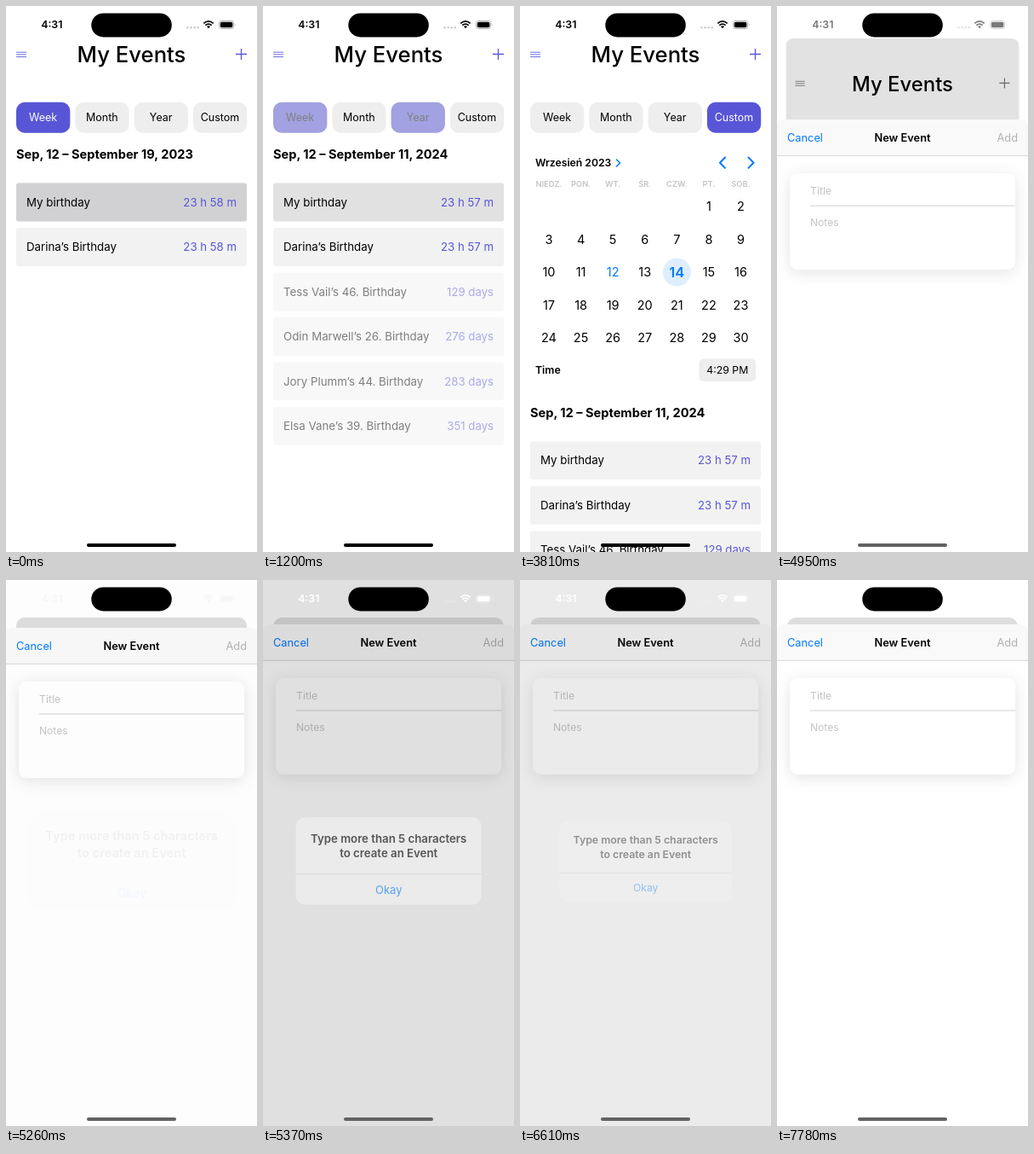
Animation of 295x640 px, one loop 8 s. Source, as an HTML page:

```html
<!DOCTYPE html>
<html lang="en">
<head>
<meta charset="utf-8">
<title>My Events</title>
<style>
  html, body { margin: 0; width: 100%; height: 100%; overflow: hidden; background: #fff; }
  svg { display: block; width: 295px; height: 640px; font-family: Inter, "Open Sans", sans-serif; }
</style>
</head>
<body>
<svg id="stage" viewBox="0 0 295 640"></svg>
<script>
const LOOP = 8000;
const INDIGO = '#5856d6', BLUE = '#007aff';
const stage = document.getElementById('stage');

const TICKS = [0, 510, 1200, 1330, 2110, 2210, 3810,
  4610, 4720, 4830, 4950, 5050, 5150, 5260, 5370, 5480, 5590, 5690,
  6390, 6500, 6610, 6720, 6840];

const EVENTS = [
  ['My birthday'], ['Darina’s Birthday'],
  ['Tess Vail’s 46. Birthday', 129],
  ['Odin Marwell’s 26. Birthday', 276],
  ['Jory Plumm’s 44. Birthday', 283],
  ['Elsa Vane’s 39. Birthday', 351]
];

const ramp = (t, a, b) => Math.min(1, Math.max(0, (t - a) / (b - a)));
const spring = (t, start, speed) => {
  const x = Math.max(0, t - start) / 1000 * speed;
  return 1 - (1 + x) * Math.exp(-x);
};

// y is the middle of the capital letters
const text = (s, x, y, size, { fill = '#000', weight = 400, anchor = 'start' } = {}) =>
  `<text x="${x}" y="${y + size * .36}" font-size="${size}" font-weight="${weight}" text-anchor="${anchor}" style="fill:${fill}">${s}</text>`;
const box = (x, y, w, h, r, fill, more = '') =>
  `<rect x="${x}" y="${y}" width="${w}" height="${h}" rx="${r}" fill="${fill}" ${more}/>`;
const line = (d, color, width, more = '') =>
  `<path d="${d}" fill="none" stroke="${color}" stroke-width="${width}" ${more}/>`;
const group = (attrs, body) => `<g ${attrs}>${body}</g>`;
const mix = (a, b, share) => `color-mix(in srgb, ${b} ${share * 100}%, ${a})`;

function header(p, pressed) {
  const tint = `style="stroke:${mix(INDIGO, '#777', Math.min(1, p * 1.2))}"`;
  return line('M12 54.2h12M12 56.9h12M12 59.6h12', INDIGO, .9, tint) +
    text('My Events', 147.5, 57, 25.7, { weight: 500, anchor: 'middle' }) +
    line('M270 56.5h13M276.5 50v13', INDIGO, 1.3, `${tint} opacity="${pressed ? .4 : 1}"`);
}

function tabs(active) {
  return ['Week', 'Month', 'Year', 'Custom'].map((name, i) => {
    const x = 12 + i * 69.3, on = active[i];
    return box(x, 112.7, 63.3, 36, 10, '#eee') +
      box(x, 112.7, 63.3, 36, 10, INDIGO, `opacity="${on}"`) +
      text(name, x + 31.6, 130.4, 12.5, { fill: mix('#000', '#fff', on), anchor: 'middle' });
  }).join('');
}

function calendar(selected) {
  const colX = i => 34 + i * 37.58;
  let s = text('Wrzesień 2023', 18, 183.7, 12.2, { weight: 600 }) +
    line('M113.5 180l4 4l-4 4', BLUE, 1.6, 'stroke-linecap="round" stroke-linejoin="round"') +
    line('M241 177.5l-6 6.2l6 6.2M268.5 177.5l6 6.2l-6 6.2', BLUE, 2, 'stroke-linecap="round" stroke-linejoin="round"');
  ['NIEDZ.', 'PON.', 'WT.', 'ŚR.', 'CZW.', 'PT.', 'SOB.'].forEach((d, i) => {
    s += text(d, colX(i), 209, 9.3, { fill: '#c4c4c6', weight: 600, anchor: 'middle' });
  });
  for (let day = 1; day <= 30; day++) {
    const cell = day + 4, x = colX(cell % 7), y = 234.8 + Math.floor(cell / 7) * 38.6;
    const on = day === selected;
    if (on) s += `<circle cx="${x}" cy="${y}" r="16.5" fill="#deeefe"/>`;
    s += text(day, x, y, on ? 16.5 : 14.5, {
      fill: on || day === 12 ? BLUE : '#000', weight: on ? 600 : 400, anchor: 'middle'
    });
  }
  return s + text('Time', 18, 427, 12.3, { weight: 600 }) +
    box(210.5, 413.5, 66.5, 26.5, 5, '#eeeeef') +
    text('4:29 PM', 243.8, 427, 12.3, { anchor: 'middle' });
}

function list(t, year, custom) {
  const top = custom * 302.7;
  const range = year ? 'Sep, 12 – September 11, 2024' : 'Sep, 12 – September 19, 2023';
  const left = t < 510 ? '23 h 58 m' : '23 h 57 m';
  const rows = EVENTS.map(([name, days], i) => {
    const y = 207.5 + i * 52.5;
    const press = i ? 0 : 1 - year;
    return group(`opacity="${i < 2 ? 1 : year}"`,
      box(12, y, 271, 45, 3, '#f2f2f2') +
      box(12, y, 271, 45, 3, '#d1d1d4', `opacity="${press}"`) +
      text(name, 24, y + 22.5, 13.3) +
      text(days ? `${days} days` : left, 271, y + 22.5, 13.2, { fill: INDIGO, anchor: 'end' }));
  }).join('');
  return group(`transform="translate(0 ${top})"`, text(range, 12, 174, 14.6, { weight: 700 }) + rows);
}

function mainScreen(t, p) {
  const year = ramp(t, 1070, 1330), custom = ramp(t, 2010, 2210);
  const scale = 1 - p * .0814;
  return `<clipPath id="card">${box(0, 0, 295, 700, 11 * p, '#fff')}</clipPath>` +
    group(`transform="translate(${147.5 * (1 - scale)} ${44 * p}) scale(${scale})" clip-path="url(#card)"`,
      box(0, 0, 295, 700, 0, '#fff') + header(p, t === 4610) +
      tabs([1 - year, 0, year - custom, custom]) +
      (custom ? group(`opacity="${custom}"`, calendar(t < 3810 ? 13 : 14)) : '') +
      list(t, year, custom) +
      box(0, 0, 295, 700, 0, '#000', `opacity="${.13 * p}"`));
}

function sheet(p) {
  const gray = '#c4c4c6';
  return group(`transform="translate(0 ${640 - 588 * p})"`,
    '<path d="M0 600V7.5Q0 0 7.5 0H287.5Q295 0 295 7.5V600Z" fill="#fff"/>' +
    '<path d="M0 42V7.5Q0 0 7.5 0H287.5Q295 0 295 7.5V42Z" fill="#f9f9f9"/>' +
    line('M0 42.4H295', '#cfcfcf', .8) +
    text('Cancel', 12, 21, 12.8, { fill: BLUE }) +
    text('New Event', 147.5, 21, 12.8, { weight: 600, anchor: 'middle' }) +
    text('Add', 283, 21, 12.8, { fill: '#b2b2b4', anchor: 'end' }) +
    box(15, 63, 265, 113, 9, '#fff', 'style="filter:drop-shadow(0 3px 9px rgba(0,0,0,.11))"') +
    text('Title', 39, 83.5, 12.3, { fill: gray }) +
    line('M39 101H280', '#c6c6c8', .8) +
    text('Notes', 39, 121, 12.1, { fill: gray }));
}

function alertBox(shown, scale, pressed) {
  const bold = { weight: 600, anchor: 'middle' };
  return box(0, 0, 295, 640, 0, '#000', `opacity="${.2 * shown}"`) +
    group(`opacity="${shown}" transform="translate(147.7 329.4) scale(${scale}) translate(-147.7 -329.4)"`,
      box(46.4, 282, 202.6, 94.8, 10.5, '#f3f3f3') +
      (pressed ? '<path d="M46.4 343.6h202.6v22.7q0 10.5-10.5 10.5h-181.6q-10.5 0-10.5-10.5z" fill="#e2e2e2"/>' : '') +
      text('Type more than 5 characters', 147.7, 304.8, 12.3, bold) +
      text('to create an Event', 147.7, 321.3, 12.3, bold) +
      line('M46.4 343.6h202.6', '#cacaca', .7) +
      text('Okay', 147.7, 360.8, 12.1, { fill: BLUE, anchor: 'middle' }));
}

function systemBar(p) {
  const ink = mix('#000', '#fff', p ** 5);
  const dots = [213.5, 217.6, 221.7, 225.8].map(x => `<circle cx="${x}" cy="25.3" r="1.2" opacity=".22"/>`).join('');
  return group(`style="fill:${ink};stroke:none"`,
      text('4:31', 53.8, 22, 12.4, { fill: ink, weight: 600, anchor: 'middle' }) + dots +
      '<path d="M238 26.3l-2-2.2q2-1.6 4 0z"/>' +
      box(251.8, 18.7, 14.6, 6.6, 1.8, 'inherit', `style="fill:${ink}"`) +
      '<path d="M269.3 20.5q1.3 1.5 0 3z" opacity=".4"/>') +
    line('M232.3 20.4q5.7-5 11.4 0M234.3 22.6q3.7-3.1 7.4 0', '#000', 1.7, `style="stroke:${ink}"`) +
    box(250.5, 17.4, 17.2, 9.2, 3, 'none', `style="stroke:${ink}" stroke-width=".8" opacity=".4"`) +
    box(100.3, 8.4, 94.5, 28, 14, '#000') +
    box(95, 630, 105, 4, 2, p > .3 ? '#626262' : '#000');
}

function draw(t) {
  const p = t < 5370 ? spring(t, 4650, 11.6) : 1;
  const appear = t < 5690 ? spring(t, 5240, 16) : 1;
  const vanish = t < 6840 ? spring(t, 6450, 13) : 1;
  const shown = appear * (1 - vanish);
  stage.innerHTML = mainScreen(t, p) + (p ? sheet(p) : '') +
    (shown ? alertBox(shown, 1.2 - .2 * appear, t === 6390) : '') + systemBar(p);
}

let last = -1;
function frame() {
  const now = performance.now() % LOOP;
  const tick = TICKS.findLast(x => x <= now);
  if (tick !== last) draw(last = tick);
  requestAnimationFrame(frame);
}
frame();
</script>
</body>
</html>
```
